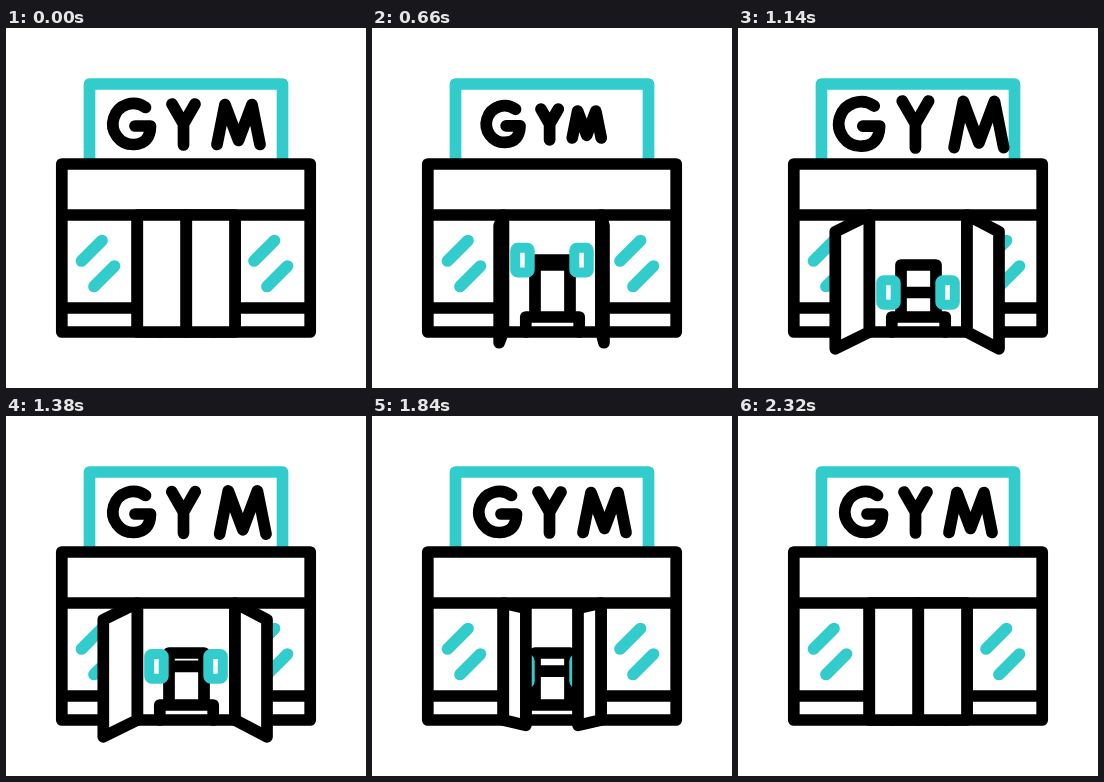
Animation of 360 by 360 pixels, one loop 2.4 s. Source, as an HTML page:

```html
<!DOCTYPE html>
<html lang="en">
<head>
<meta charset="utf-8">
<title>Gym</title>
<style>
html, body { margin: 0; height: 100%; overflow: hidden; background: #fff; }
svg { display: block; width: 100%; height: 100%; fill: none; stroke: #000; stroke-width: 11.7; stroke-linecap: round; stroke-linejoin: round; }
.teal { stroke: #3cc; }
.solid { fill: #fff; }
rect { stroke-width: 10; }
</style>
</head>
<body>
<svg viewBox="0 0 360 360">
  <path class="teal" d="M83.500 134V56H276.500V134"/>
  <g id="letters">
    <path d="M139.500 79.500A20.500 20.500 0 1 0 128 116.500Q144 116 144.500 98H129"/>
    <path d="M166 76L177.500 96L189 76M177.500 96V117"/>
    <path d="M211 116.500L219 76.500L232.500 112.500L246 76.500L254 116.500"/>
  </g>
  <path class="teal" d="M75.500 233L96 212.500M88 258.500L108.500 238M248 233L268.500 212.500M261 258.500L281.500 238"/>
  <path d="M55.800 136H304.200V304H55.800ZM55.800 187H304.200M55.800 280H131M229 280H304M131.300 187V304M229 187V304"/>
  <path d="M163 289V237H198V289M153.800 304V289H207.200V304"/>
  <g id="weights">
    <path d="M163 0H198"/>
    <g class="teal solid">
      <rect x="143.200" y="-12.300" width="14.500" height="24.600" rx="2.500"/>
      <rect x="202.300" y="-12.300" width="14.500" height="24.600" rx="2.500"/>
    </g>
  </g>
  <path id="left" class="solid"/>
  <path id="right" class="solid"/>
</svg>
<script>
const LOOP = 2400, STROKE = 11.7;
const $ = id => document.getElementById(id);
const letters = [...$('letters').children];
const progress = (t, from, to) => Math.min(1, Math.max(0, (t - from) / (to - from)));
const ease = p => (1 - Math.cos(Math.PI * p)) / 2;
const cubic = p => p < .5 ? 4 * p ** 3 : 1 - 4 * (1 - p) ** 3;
const step = (t, from, to) => ease(progress(t, from, to));

// Shrink, overshoot, settle
const letterScale = t => 1 - .33 * step(t, 0, 400) + .49 * step(t, 400, 950) - .16 * step(t, 950, 1350);

// The free edge drops as it swings across the hinge
function doorPath(hinge, end, open) {
  const closed = 180.3;
  const free = closed + (end - closed) * open;
  const drop = 16.8 * open;
  return `M${hinge} 187L${free} ${187 + drop}V${304 + drop}L${hinge} 304Z`;
}

function draw(t) {
  letters.forEach((letter, i) => {
    const s = letterScale(t - i * 115);
    letter.setAttribute('transform', `translate(178 96.500) scale(${s}) translate(-178 -96.500)`);
    letter.setAttribute('stroke-width', STROKE / s);
  });
  const cycle = t % 800 / 400;
  const low = cubic(cycle < 1 ? cycle : 2 - cycle);
  $('weights').setAttribute('transform', `translate(0 ${225.5 + 39.5 * low})`);
  const open = step(t, 230, 960) - step(t, 1470, 2070);
  $('left').setAttribute('d', doorPath(131.3, 97.3, open));
  $('right').setAttribute('d', doorPath(229, 261, open));
}

const start = performance.now();
function frame() {
  draw((performance.now() - start) % LOOP);
  requestAnimationFrame(frame);
}
frame();
</script>
</body>
</html>
```
